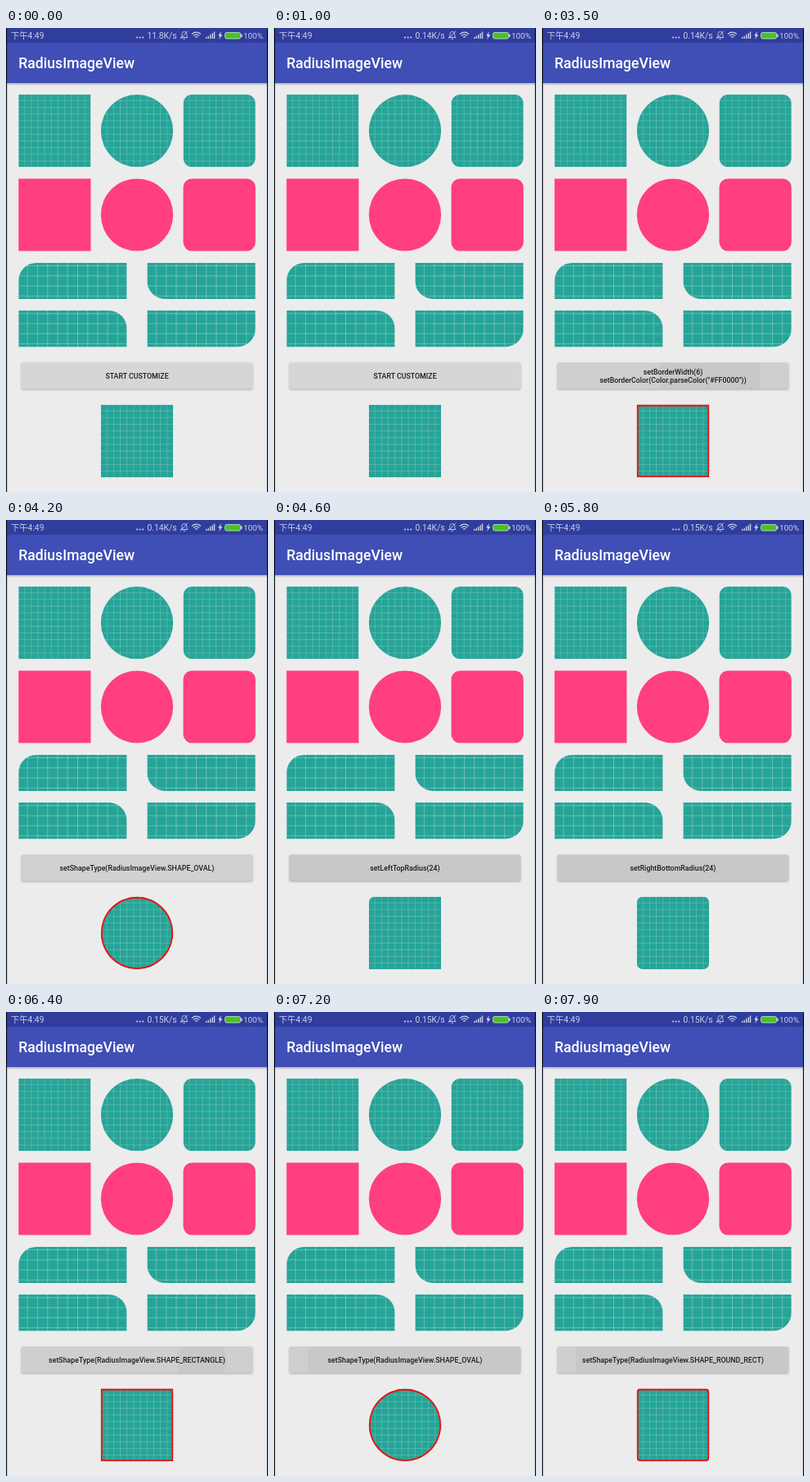
Animation, 320 px wide and 565 px high, one loop 8000 ms. Source, as an HTML page:

```html
<!DOCTYPE html>
<html lang="en">
<head>
<meta charset="utf-8">
<title>RadiusImageView</title>
<style>
  html, body { margin: 0; width: 100%; height: 100%; overflow: hidden; }
  body { background: #ececed; }
  svg { display: block; }
  #stage { position: absolute; left: 0; top: 0; font-family: Roboto, "Noto Sans CJK SC", "Noto Sans CJK", sans-serif; }
  #header { filter: drop-shadow(0 1px 1.5px rgba(0,0,0,.35)); }
  #label { font-weight: 500; font-size: 8.82px; fill: #1c1c1c; text-anchor: middle; }
</style>
</head>
<body>
<svg id="stage" width="320" height="565" viewBox="0 0 320 565">
  <defs>
    <g id="grid"></g>
    <clipPath id="buttonClip"><rect x="18.8" y="407.5" width="282.4" height="31.9" rx="1.8"/></clipPath>
  </defs>
  <rect width="320" height="565" fill="#ececed"/>
  <g id="header">
    <rect width="320" height="67" fill="#3f4fb5"/>
    <rect width="320" height="17.8" fill="#303d9c"/>
  </g>
  <g fill="#ccd0ee" font-size="10.3">
    <text x="6" y="12.8">下午4:49</text>
    <circle cx="160" cy="11.5" r="1.1"/><circle cx="163.6" cy="11.5" r="1.1"/><circle cx="167.2" cy="11.5" r="1.1"/>
    <text id="speed" x="208.5" y="12.8" text-anchor="end"></text>
    <g fill="none" stroke="#ccd0ee">
      <path d="M213.5 11.5h8.5c-1.4-1-1.3-2.3-1.3-4 0-4-5.8-4-5.8 0 0 1.7.1 3-1.4 4M216.5 13.2h2.5M221.8 3.8l-8.6 9.4" stroke-width=".9"/>
      <path d="M227 7.4q5.5-4.6 11 0M229 9.4q3.5-2.9 7 0M231 11.2q1.5-1.2 3 0" stroke-width="1.3"/>
      <path d="M244.7 13v-2M247.2 13v-3.3M249.7 13v-5M252.2 13v-6.7M254.5 13v-8.4" stroke-width="1.4"/>
    </g>
    <path d="M263 4l-4 5.5h2.3L260 14l4.5-6h-2.6z"/>
    <rect x="267.5" y="5.5" width="19" height="7.5" rx="2" fill="#45c51f" stroke="#bfd9d0" stroke-width=".9"/>
    <rect x="287" y="7.5" width="1.5" height="3.5" rx=".5"/>
    <text x="290" y="12.8" font-size="9.9">100%</text>
    <text x="15.3" y="49" fill="#fff" font-size="17.64" font-weight="500">RadiusImageView</text>
  </g>
  <g id="tiles"></g>
  <rect id="button" x="18.8" y="407.5" width="282.4" height="31.9" rx="1.8" fill="#d6d6d6"/>
  <g clip-path="url(#buttonClip)">
    <rect id="wash" x="18" y="407" width="284" height="33"/>
    <circle id="ripple" cy="424.5"/>
  </g>
  <text id="label"></text>
  <path d="M.6 0V565M319.4 0V565" stroke="#111" stroke-width="1.2"/>
</svg>
<script>
const $ = id => document.getElementById(id);
const LOOP = 8000, STEP = 100;
const DP = .882, PAD = 15.3;
const SIDE = 100 * DP, WIDE = 150 * DP, LOW = 50 * DP;
const RIGHT = 320 - PAD;

// Grid drawable on a 108-unit square; the inner area is ruled a little brighter.
let outer = "", inner = "";
for (let p = 9; p < 108; p += 10) {
  outer += `M${p} 0V108M0 ${p}H108`;
  if (p > 19 && p < 89) inner += `M${p} 19V89M19 ${p}H89`;
}
const rule = (d, alpha) => `<path d="${d}" fill="none" stroke="#fff" stroke-opacity="${alpha}" stroke-width=".8"/>`;
$("grid").innerHTML = `<rect width="108" height="108" fill="#26a497"/>${rule(outer, .27)}${rule(inner, .08)}`;

// Rectangle path with corner radii: top left, top right, bottom right, bottom left.
function shape(x, y, w, h, [a, b, c, d]) {
  const arc = (r, dx, dy) => `a${r} ${r} 0 0 1 ${dx * r} ${dy * r}`;
  return `M${x + a} ${y}H${x + w - b}${arc(b, 1, 1)}V${y + h - c}${arc(c, -1, 1)}` +
    `H${x + d}${arc(d, -1, -1)}V${y + a}${arc(a, 1, -1)}Z`;
}
const all = r => [r, r, r, r];

function gridTile(x, y, w, h, radii, id) {
  const k = w / 108;
  $("tiles").insertAdjacentHTML("beforeend", `
    <clipPath id="${id}Clip"><path id="${id}Path" d="${shape(x, y, w, h, radii)}"/></clipPath>
    <g clip-path="url(#${id}Clip)">
      <use href="#grid" transform="translate(${x} ${y + (h - w) / 2}) scale(${k})"/>
      <use id="${id}Rim" href="#${id}Path" fill="none" stroke="#f80d0d" stroke-width="3.7" visibility="hidden"/>
    </g>`);
}

const OVAL = all(SIDE / 2), SQUARE = all(0);
const middle = 160 - SIDE / 2;
[SQUARE, OVAL, all(11)].forEach((radii, i) => {
  const x = [PAD, middle, RIGHT - SIDE][i];
  gridTile(x, 81.1, SIDE, SIDE, radii, "square" + i);
  $("tiles").insertAdjacentHTML("beforeend",
    `<path d="${shape(x, 183.4, SIDE, SIDE, radii)}" fill="#ff3f80"/>`);
});
[[22, 0, 0, 0], [0, 0, 0, 22], [0, 22, 0, 0], [0, 0, 22, 0]].forEach((radii, i) =>
  gridTile(i % 2 ? RIGHT - WIDE : PAD, i < 2 ? 285.9 : 344.1, WIDE, LOW, radii, "wide" + i));
gridTile(middle, 458.8, SIDE, SIDE, SQUARE, "preview");

const BORDER = ["setBorderWidth(6)", 'setBorderColor(Color.parseColor("#FF0000"))'];
const shapeCall = name => [`setShapeType(RadiusImageView.SHAPE_${name})`];

// time, label lines, preview radii, border shown, touch x, ripple start radius
const taps = [
  [-2000, ["START CUSTOMIZE"], SQUARE, false, 239, 31],
  [3500, BORDER, SQUARE, true, 205, 62],
  [3800, shapeCall("OVAL"), OVAL, true, 239, 31],
  [4400, ["setLeftTopRadius(24)"], [7, 0, 0, 0], false, 239, 31],
  [4800, ["setLeftBottomRadius(24)"], [7, 0, 0, 7], false, 239, 31],
  [5200, ["setRightTopRadius(24)"], [7, 7, 0, 7], false, 239, 31],
  [5600, ["setRightBottomRadius(24)"], all(7), false, 239, 31],
  [6000, BORDER, all(7), true, 239, 31],
  [6400, shapeCall("RECTANGLE"), SQUARE, true, 239, 31],
  [7100, shapeCall("OVAL"), OVAL, true, 239, 31],
  [7800, shapeCall("ROUND_RECT"), all(4), true, 239, 31]
];
const speeds = [[0, "11.8K/s"], [1000, "0.14K/s"], [4700, "0.15K/s"]];

const latest = (list, t) => list.filter(row => row[0] <= t).pop();
const set = (id, attrs) => { for (const k in attrs) $(id).setAttribute(k, attrs[k]); };

function render(t) {
  const [start, lines, radii, bordered, touch, r0] = latest(taps, t);
  const age = t - start;
  const press = Math.max(0, Math.min(1, (500 - age) / 300));

  $("speed").textContent = latest(speeds, t)[1];
  $("label").innerHTML = lines.map((s, i) =>
    `<tspan x="160" y="${427 + (i - (lines.length - 1) / 2) * 10.4}">${s}</tspan>`).join("");
  set("previewPath", { d: shape(middle, 458.8, SIDE, SIDE, radii) });
  set("previewRim", { visibility: bordered ? "visible" : "hidden" });

  set("wash", { opacity: .032 * press });
  set("ripple", { cx: touch, r: r0 + age * 1.67, opacity: .035 * press });
  $("button").style.filter = `drop-shadow(0 ${1 + press * .5}px ${.8 + press * .5}px rgba(0,0,0,.28))`;
}

let shown = -1;
function tick(now) {
  const t = Math.floor(now % LOOP / STEP) * STEP;
  if (t !== shown) render(shown = t);
  requestAnimationFrame(tick);
}
render(0);
requestAnimationFrame(tick);
</script>
</body>
</html>
```
